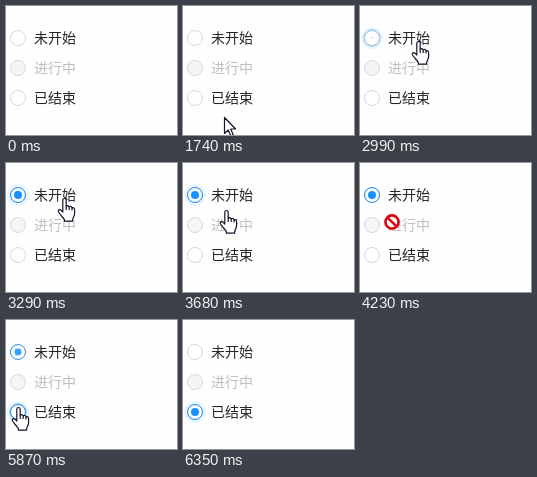
Recreate the animation shown at these times as an HTML page. Size 171 by 129 pixels, loop 7.25 s.

```html
<!DOCTYPE html>
<html lang="zh-CN">
<head>
<meta charset="utf-8">
<title>Radio group</title>
<style>
html, body { margin: 0; width: 100%; height: 100%; overflow: hidden; background: #fefefe; }
svg { display: block; width: 171px; height: 129px; }
text { font: 300 14px "Noto Sans CJK SC", "Noto Sans CJK", sans-serif; fill: #262626; }
.off text { fill: #bfbfbf; }
.box { fill: #fff; stroke: #d9d9d9; }
.off .box { fill: #f5f5f5; }
.ring, .wave { fill: none; stroke: #1890ff; }
.dot, .halo { fill: #1890ff; }
.cursor { fill: #fff; stroke: #14142b; stroke-width: 1.2; stroke-linejoin: round; stroke-linecap: round; }
</style>
</head>
<body>
<svg viewBox="0 0 171 129">
  <g id="rows"></g>
  <g id="arrow" class="cursor">
    <path d="M.5 .5V16.5L4.2 13L6.8 18.8L9.2 17.7L6.7 12H11.6Z"/>
  </g>
  <g id="hand" class="cursor">
    <path d="M5.8 14V2.2a1.7 1.7 0 0 1 3.4 0V8.2Q10.8 6.9 12.2 8.8Q14.2 7.8 15 9.8Q17.6 9.2 17.6 11.8V15.5C17.6 18.6 15.6 19.6 15.6 22V23.2H7.4V21.6C5.8 19 3 16.6 1.4 13.8C.7 12 2.8 11 4.2 12.4Z"/>
    <path d="M9.2 8.2V11.5M12.2 8.8V11.5M15 9.8V12" fill="none"/>
  </g>
  <g id="ban">
    <circle cx="8" cy="8" r="6.6" fill="#fff" stroke="#d8000f" stroke-width="2.6"/>
    <path d="M3.6 3.6L12.4 12.4" stroke="#d8000f" stroke-width="2.6"/>
  </g>
</svg>
<script>
const LOOP = 7250;
const PRESS_A = 2990, PRESS_B = 5870;
const $ = id => document.getElementById(id);
const clamp = v => Math.max(0, Math.min(1, v));
const ease = v => 1 - (1 - clamp(v)) ** 2;

// time, cursor, x, y; the screen refreshes only at these times
const steps = [
  [0, ''],
  [1740, 'arrow', 41, 111], [1860, 'hand', 44, 91], [1980, 'ban', 47, 62], [2100, 'hand', 49, 51],
  [2250, 'hand', 51, 38], [2560, 'hand', 51, 35],
  [PRESS_A, 'hand', 51, 35], [3140, 'hand', 51, 35], [3290, 'hand', 51, 35], [3410, 'hand', 51, 35],
  [3560, 'hand', 48, 36], [3680, 'hand', 36, 47], [3800, 'ban', 24, 47],
  [4080, 'ban', 24, 49], [4230, 'ban', 24, 51],
  [4970, 'ban', 24, 56], [5090, 'ban', 20, 65], [5210, 'hand', 14, 80],
  [5360, 'hand', 11, 82], [5480, 'hand', 7, 85], [5600, 'hand', 5, 87],
  [PRESS_B, 'hand', 5, 87], [5990, 'hand', 5, 87], [6110, 'hand', 48, 88], [6230, 'hand', 105, 88],
  [6350, '']
];

$('rows').innerHTML = ['未开始', '进行中', '已结束'].map((label, i) => `
  <g class="${i === 1 ? 'off' : ''}" transform="translate(12 ${32 + 30 * i})">
    <circle class="halo" r="11"/><circle class="wave" r="7.5"/>
    <circle class="box" r="7.5"/><circle class="ring" r="7.5"/><circle class="dot" r="4"/>
    <text x="16" y="5">${label}</text>
  </g>`).join('');
const rows = [...$('rows').children];

function setRadio(row, { ring = 0, dot = 0, wave = 0, halo = 0 }) {
  const part = name => row.querySelector('.' + name);
  const spread = ease(wave);
  part('ring').setAttribute('opacity', ring);
  part('dot').setAttribute('opacity', dot);
  part('dot').setAttribute('r', 4 * dot);
  part('wave').setAttribute('r', 7.5 * (1 + 0.6 * spread));
  part('wave').setAttribute('opacity', wave > 0 && wave < 1 ? 0.5 * (1 - spread) : 0);
  part('halo').setAttribute('opacity', halo);
}

// progress since a press, already under way in its first picture
const since = (t, press, length) => t < press ? 0 : (t - press + 40) / length;

function render(time) {
  const [t, kind, x, y] = steps.filter(s => s[0] <= time).pop();

  for (const id of ['arrow', 'hand', 'ban']) {
    $(id).style.display = id === kind ? '' : 'none';
  }
  if (kind) $(kind).setAttribute('transform', `translate(${x} ${y})`);

  const leave = 1 - clamp(since(t, PRESS_B, 300));
  const enter = ease(since(t, PRESS_A, 300));
  setRadio(rows[0], {
    ring: Math.min(enter, leave),
    dot: Math.min(enter, leave),
    wave: since(t, PRESS_A, 440),
    halo: t >= PRESS_A && t < 4230 ? 0.08 : 0
  });
  setRadio(rows[1], {});
  setRadio(rows[2], {
    ring: clamp((t - 5240) / 300),
    dot: ease(since(t, PRESS_B, 300)),
    wave: since(t, PRESS_B, 440),
    halo: t >= PRESS_B ? 0.08 : 0
  });
}

const start = performance.now();
function tick() {
  render((performance.now() - start) % LOOP);
  requestAnimationFrame(tick);
}
tick();
</script>
</body>
</html>
```
